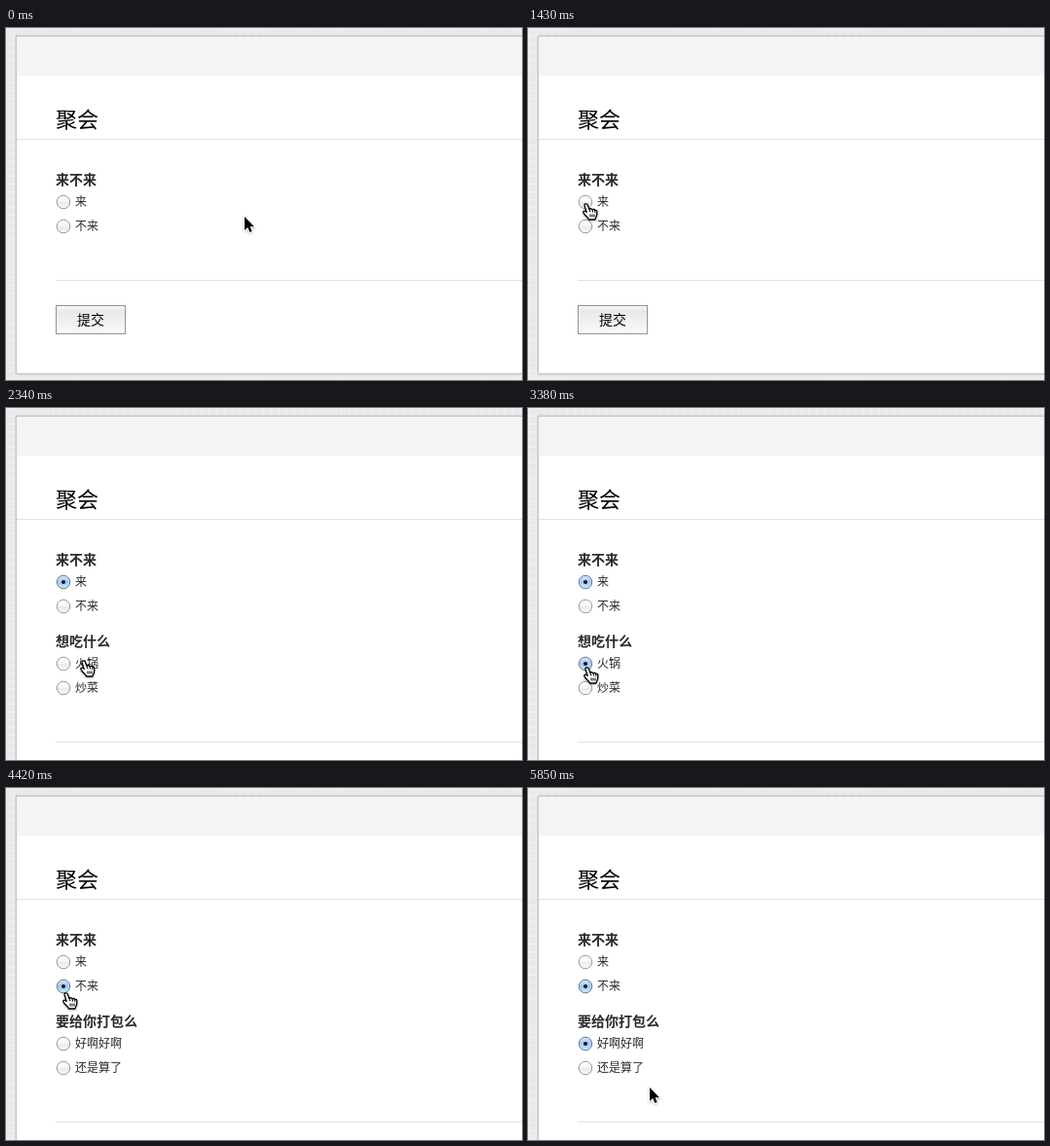
These frames come from a looping animation (530 px wide and 362 px high, 5980 ms). An HTML page:

```html
<!DOCTYPE html>
<html lang="zh-CN">
<head>
<meta charset="utf-8">
<style>
html, body { margin: 0; width: 100%; height: 100%; overflow: hidden; background: #e9e9e9; }
svg { display: block; }
text { font: 12px "Noto Sans CJK SC", "Noto Sans CJK", sans-serif; fill: #2a2a2a; }
.title { font-size: 22px; fill: #000; }
.question { font-size: 14px; font-weight: bold; }
.button { font-size: 14px; fill: #000; }
.rule { stroke: #e2e2e2; }
.radio circle:first-child { fill: url(#idle); stroke: #979797; }
.radio .dot { fill: none; }
.radio.pressed circle:first-child { fill: url(#down); stroke: #858585; }
.radio.on circle:first-child { fill: url(#blue); stroke: #5f7ba3; }
.radio.on .dot { fill: #0b1a30; }
</style>
</head>
<body>
<svg width="530" height="362" viewBox="0 0 530 362">
  <defs>
    <pattern id="grid" width="8" height="8" patternUnits="userSpaceOnUse">
      <path d="M0 .5H8M.5 0V8" stroke="#f0f0f0"/>
    </pattern>
    <linearGradient id="idle" x2="0" y2="1">
      <stop stop-color="#fff"/><stop offset=".48" stop-color="#f6f6f6"/>
      <stop offset=".55" stop-color="#e9e9e9"/><stop offset="1" stop-color="#fcfcfc"/>
    </linearGradient>
    <linearGradient id="down" x2="0" y2="1">
      <stop stop-color="#d6d6d6"/><stop offset=".5" stop-color="#c4c4c4"/><stop offset="1" stop-color="#dadada"/>
    </linearGradient>
    <linearGradient id="blue" x2="0" y2="1">
      <stop stop-color="#d9e8f7"/><stop offset=".5" stop-color="#a6c6e8"/><stop offset="1" stop-color="#d0eafa"/>
    </linearGradient>
    <linearGradient id="face" x2="0" y2="1">
      <stop stop-color="#f8f8f8"/><stop offset=".2" stop-color="#e8e9e9"/><stop offset="1" stop-color="#f9f9f9"/>
    </linearGradient>
    <filter id="soft" x="-5%" y="-5%" width="110%" height="110%">
      <feDropShadow dx="0" dy="0" stdDeviation="1.3" flood-opacity=".2"/>
    </filter>
    <filter id="lift" x="-50%" y="-50%" width="200%" height="200%">
      <feDropShadow dx="0" dy="1" stdDeviation="1" flood-opacity=".3"/>
    </filter>
  </defs>

  <rect width="530" height="362" fill="url(#grid)"/>
  <rect id="card" x="10.5" y="8.5" width="560" fill="#fff" stroke="#c6c6c6" filter="url(#soft)"/>
  <rect x="11" y="9" width="519" height="40" fill="#f4f4f4"/>
  <text class="title" x="51" y="102">聚会</text>
  <path class="rule" d="M11 114.5H530"/>
  <text class="question" x="51" y="160.5">来不来</text>
  <g id="options"></g>
  <text class="question" id="followUp" x="51" y="244.5"></text>
  <g id="footer">
    <path class="rule" d="M51 259.5H530"/>
    <rect x="51.5" y="285.5" width="71" height="29" fill="url(#face)" stroke="#949494"/>
    <text class="button" x="73" y="304.5">提交</text>
  </g>

  <g id="arrow" filter="url(#lift)">
    <path d="M0 0V14L3.2 11L5.4 16L7.7 15L5.6 10.2H10Z" stroke="#fff" stroke-width="1.6" paint-order="stroke"/>
  </g>
  <g id="hand" filter="url(#lift)" stroke="#000" stroke-linejoin="round" stroke-width="1.3">
    <path fill="#fff" d="M-2 1.4C-2.2-.4 .6-.8 1.3 1L3 5.4C4 4.4 5.5 4.6 6 5.8C7 5 8.3 5.3 8.6 6.6C10 5.8 10.8 6.8 10.9 8.2L10.6 11.6C10.2 13.4 9.2 14 9 16H2.5C2 14-1 12.5-2.6 9.6C-4 7.8-2.4 6.4-.8 7.6L.2 8.4Z"/>
    <path fill="none" stroke-width="1" d="M3 5.4L4 8.4M6 5.8L6.6 8.6M8.6 6.6L9 9M4 10.5V13.5M6 10.5V13.5M8 10.5V13.5"/>
  </g>
</svg>
<script>
const LOOP = 5980, STEP = 130;
const $ = id => document.getElementById(id);

// Eased pointer moves
const origin = [245, 194];
const moves = [
  { from: 0, to: 650, at: [76, 181] },
  { from: 650, to: 1430, at: [60, 181] },
  { from: 1820, to: 2340, at: [80, 260] },
  { from: 2340, to: 2730, at: [60, 264] },
  { from: 2860, to: 2990, at: [61, 267] },
  { from: 3640, to: 3900, at: [62, 204] },
  { from: 4290, to: 4940, at: [62, 269] },
  { from: 5330, to: 5850, at: [125, 308] }
];

// Each press lasts one step before the option is chosen
const clicks = [
  { time: 1690, option: 0 }, { time: 3250, option: 2 },
  { time: 4160, option: 1 }, { time: 5200, option: 2 }
];

const followUps = [
  ['想吃什么', '火锅', '炒菜'],
  ['要给你打包么', '好啊好啊', '还是算了']
];

const rowY = i => 179 + 25 * (i % 2) + 84 * (i >> 1);

const options = [0, 1, 2, 3].map(i => {
  const y = rowY(i);
  $('options').insertAdjacentHTML('beforeend',
    `<g><g class="radio"><circle cx="59" cy="${y}" r="6.8"/><circle class="dot" cx="59" cy="${y}" r="2.1"/></g>
     <text x="71" y="${y + 4}"></text></g>`);
  const group = $('options').lastElementChild;
  return { group, radio: group.firstElementChild, label: group.querySelector('text') };
});

function pointerAt(t) {
  let point = origin;
  for (const { from, to, at } of moves) {
    const k = Math.min(1, Math.max(0, (t - from) / (to - from)));
    const eased = k * k * (3 - 2 * k);
    point = point.map((v, axis) => v + (at[axis] - v) * eased);
  }
  return point.map(Math.round);
}

function formAt(t) {
  const form = { first: -1, second: -1, pressed: -1 };
  for (const { time, option } of clicks) {
    if (t >= time && t < time + STEP) form.pressed = option;
    if (t < time + STEP) continue;
    if (option < 2) Object.assign(form, { first: option, second: -1 });
    else form.second = option;
  }
  return form;
}

function render(t) {
  const { first, second, pressed } = formAt(t);
  const open = first >= 0;
  const [question, ...answers] = followUps[first] || [''];
  const labels = ['来', '不来', ...answers];

  $('followUp').textContent = question;
  options.forEach(({ group, radio, label }, i) => {
    const state = i === first || i === second ? 'on' : i === pressed ? 'pressed' : '';
    group.style.display = i < labels.length ? '' : 'none';
    label.textContent = labels[i] || '';
    radio.setAttribute('class', `radio ${state}`);
  });

  const grow = open ? 84 : 0;
  $('footer').setAttribute('transform', `translate(0 ${grow})`);
  $('card').setAttribute('height', 347 + grow);

  const [x, y] = pointerAt(t);
  const overOption = x < 96 && labels.some((_, i) => Math.abs(y - rowY(i)) <= 8);
  for (const [id, shown] of [['hand', overOption], ['arrow', !overOption]]) {
    $(id).style.display = shown ? '' : 'none';
    $(id).setAttribute('transform', `translate(${x} ${y})`);
  }
}

const start = performance.now();
function tick() {
  const t = (performance.now() - start) % LOOP;
  render(Math.floor(t / STEP) * STEP);
  requestAnimationFrame(tick);
}
tick();
</script>
</body>
</html>
```
